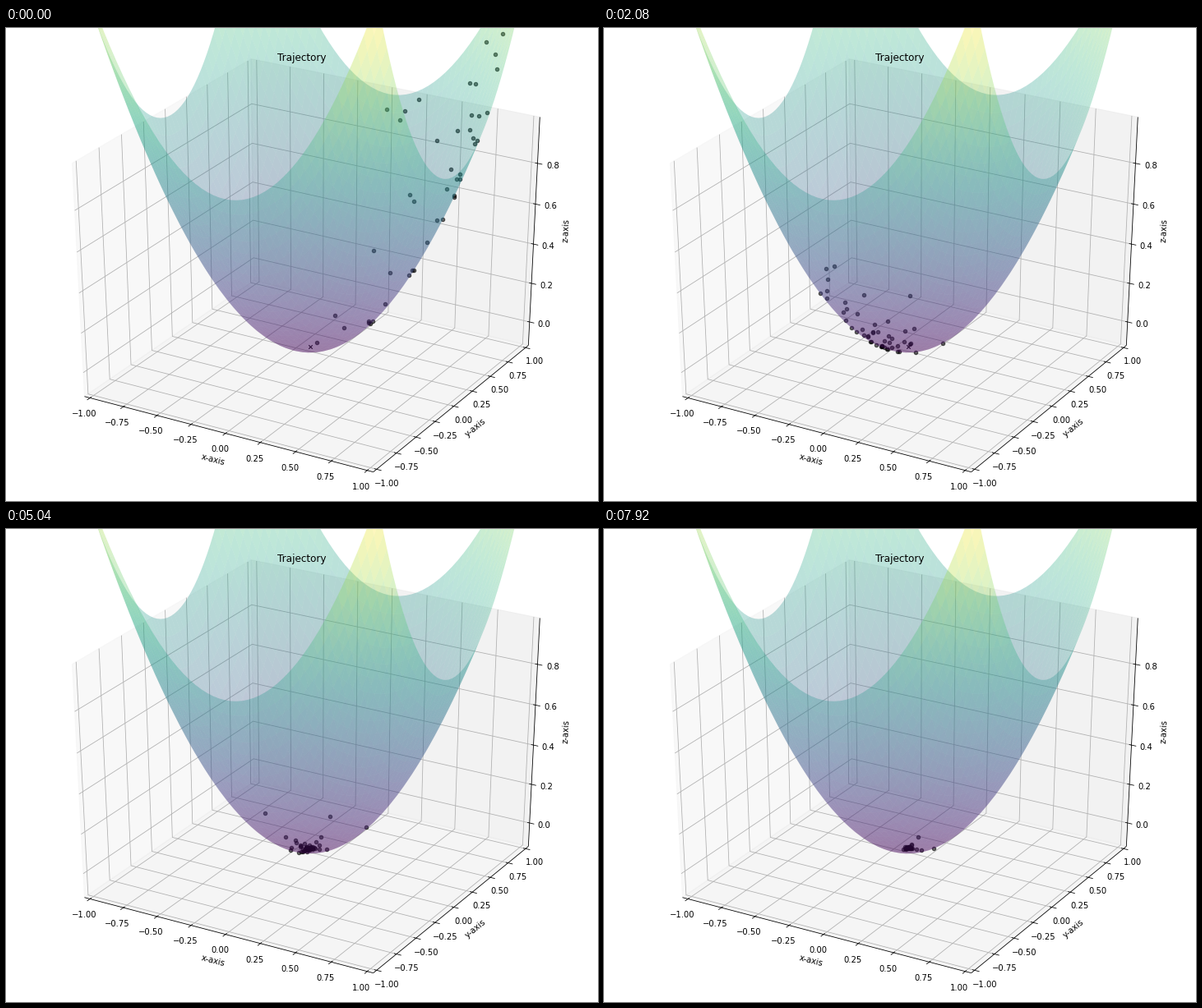
Recreate the animation shown at these times as a matplotlib script. Size 720 by 576 pixels, loop 8 s.

```python
import numpy as np
import matplotlib.pyplot as plt
from matplotlib.animation import FuncAnimation
from matplotlib.collections import LineCollection, PolyCollection

W, H = 720, 576
FRAMES, INTERVAL = 100, 80
Z_MIN, Z_MAX = -0.1, 1.0
DIST = 10
M = 0.5 + 1 / 48          # half size of the box, margin included
DELTA = 1 / 12            # unit for ticks and paddings
PER_POINT = 48 / (W + H) * DELTA

plt.rcParams["font.family"] = "DejaVu Sans"
plt.rcParams["font.size"] = 10

# Camera basis: elevation 30 degrees, azimuth -60 degrees
ELEV, AZIM = np.radians([30, -60])
TOWARD = np.array([np.cos(AZIM) * np.cos(ELEV),
                   np.sin(AZIM) * np.cos(ELEV), np.sin(ELEV)])
RIGHT = np.array([-np.sin(AZIM), np.cos(AZIM), 0])
UP = np.cross(TOWARD, RIGHT)


def project(p):
    """Box coordinates (centred, unit size) to stage pixels and depth."""
    p = np.asarray(p, float)
    depth = DIST - p @ TOWARD
    sx = (p @ RIGHT / depth + 0.095) / 0.185 * W
    sy = H - (p @ UP / depth + 0.095) / 0.185 * H
    return np.stack([sx, sy], axis=-1), depth


def box_z(z):
    return (z - Z_MIN) / (Z_MAX - Z_MIN) - 0.5


def lift(x, y):
    """Put points of the plane onto the bowl, in box coordinates."""
    return np.stack([x / 2, y / 2, box_z(x**2 + y**2)], axis=-1)


def at(base, i, t):
    p = np.array(base, float)
    p[i] = t
    return p


fig = plt.figure(figsize=(W / 72, H / 72), dpi=72, facecolor="white")
ax = fig.add_axes([0, 0, 1, 1])
ax.set_xlim(0, W)
ax.set_ylim(H, 0)
ax.axis("off")


def draw_pane(corners, shade):
    xy, _ = project(corners)
    ax.add_patch(plt.Polygon(xy, facecolor=str(shade), edgecolor=str(shade),
                             linewidth=1, alpha=0.5, zorder=0))


def draw_axis(i, name, ticks, fmt, base, tick_dir, outward, wall):
    """One box axis: grid, axis line, ticks, tick labels and name."""
    ends, _ = project([at(base, i, -M), at(base, i, M)])
    push = np.sign(base)
    grid, marks = [], []
    for value, t in ticks:
        grid.append(project([at(w, i, t) for w in wall])[0])
        edge = at(base, i, t)
        step = at(np.zeros(3), tick_dir, outward * DELTA)
        marks.append(project([edge - 0.1 * step, edge + 0.2 * step])[0])
        (lx, ly), _ = project(edge + push * 11.5 * PER_POINT)
        ax.text(lx, ly, fmt.format(value).replace("-", "\u2212"),
                ha="center", va="top")
    ax.add_collection(LineCollection(grid, colors="#b0b0b0",
                                     linewidths=0.8, zorder=1))
    ax.add_collection(LineCollection(marks + [ends], colors="black",
                                     linewidths=0.8, zorder=1.2))
    dx, dy = ends[1] - ends[0]
    (lx, ly), _ = project(at(base, i, 0) + push * 25 * PER_POINT)
    ax.text(lx, ly, name, ha="center", va="center",
            rotation=np.degrees(np.arctan2(-dy, dx)))


draw_pane([(-M, -M, -M), (-M, M, -M), (-M, M, M), (-M, -M, M)], 0.95)
draw_pane([(-M, M, -M), (M, M, -M), (M, M, M), (-M, M, M)], 0.9)
draw_pane([(-M, -M, -M), (M, -M, -M), (M, M, -M), (-M, M, -M)], 0.925)

flat = [(v, v / 2) for v in np.linspace(-1, 1, 9)]
tall = [(v, box_z(v)) for v in np.arange(5) * 0.2]
draw_axis(0, "x-axis", flat, "{:.2f}", (0, -M, -M), 1, -1,
          [(0, -M, -M), (0, M, -M), (0, M, M)])
draw_axis(1, "y-axis", flat, "{:.2f}", (M, 0, -M), 0, 1,
          [(M, 0, -M), (-M, 0, -M), (-M, 0, M)])
draw_axis(2, "z-axis", tall, "{:.1f}", (M, M, 0), 0, 1,
          [(-M, -M, 0), (-M, M, 0), (M, M, 0)])
ax.text(W / 2, H * 0.08 - 6, "Trajectory", fontsize=12, ha="center",
        va="baseline", zorder=5)


def draw_bowl(n=50):
    gx, gy = np.meshgrid(np.linspace(-1, 1, n + 1), np.linspace(-1, 1, n + 1))

    def quads(a):
        return np.stack([a[:-1, :-1], a[:-1, 1:], a[1:, 1:], a[1:, :-1]],
                        axis=2).reshape((n * n, 4) + a.shape[2:])

    xy, depth = project(lift(gx, gy))
    height = quads(gx**2 + gy**2).mean(axis=1)
    height = (height - height.min()) / np.ptp(height)
    order = np.argsort(-quads(depth).mean(axis=1))
    colors = plt.get_cmap("viridis")(height[order], alpha=0.3)
    ax.add_collection(PolyCollection(quads(xy)[order], facecolors=colors,
                                     edgecolors="none", zorder=3))


draw_bowl()

# Stage positions of the particles at the start
START = [
    (604, 7), (584, 17), (595, 32), (597, 50), (564, 67), (571, 68),
    (502, 87), (463, 99), (485, 101), (479, 112), (585, 103), (566, 106),
    (575, 107), (549, 125), (564, 124), (568, 134), (573, 137), (570, 141),
    (524, 137), (541, 172), (552, 178), (548, 184), (552, 184), (536, 196),
    (545, 204), (545, 206), (491, 203), (496, 211), (524, 234), (531, 233),
    (512, 261), (447, 271), (467, 298), (494, 295), (496, 295), (490, 301),
    (461, 336), (400, 350), (446, 357), (441, 357), (441, 359), (443, 360),
    (411, 365), (378, 383)]


def unproject(points):
    """Find the plane positions on the inner side of the bowl."""
    g = np.linspace(0, 1, 701)
    gx, gy = (a.ravel() for a in np.meshgrid(g, g))
    inner = gy > 0.577 * gx - 0.2
    gx, gy = gx[inner], gy[inner]
    xy, _ = project(lift(gx, gy))
    best = [np.argmin((xy[:, 0] - px)**2 + (xy[:, 1] - py)**2)
            for px, py in points]
    return np.column_stack([gx[best], gy[best]])


def swarm(w=0.9, c1=0.5, c2=0.3):
    """Particle swarm on the sphere function, one position set per frame."""
    rng = np.random.default_rng(4)
    pos = np.vstack([unproject(START), rng.uniform(0.89, 1, (6, 2))])
    vel = rng.uniform(0, 1, pos.shape)
    best, best_cost = pos.copy(), np.full(len(pos), np.inf)
    history = []
    for _ in range(FRAMES):
        cost = (pos**2).sum(axis=1)
        better = cost < best_cost
        best[better], best_cost[better] = pos[better], cost[better]
        leader = best[best_cost.argmin()]
        history.append(project(lift(pos[:, 0], pos[:, 1]))[0])
        r1, r2 = rng.uniform(0, 1, (2,) + pos.shape)
        vel = w * vel + c1 * r1 * (best - pos) + c2 * r2 * (leader - pos)
        pos = pos + vel
    return history


history = swarm()
goal, _ = project(lift(0.0, 0.0))
ax.scatter(*goal, s=20, marker="x", color="black", linewidths=1, zorder=2)
dots = ax.scatter(*history[0].T, s=20, color="black", alpha=0.6,
                  linewidths=1, zorder=2.2)
ax.set_xlim(0, W)
ax.set_ylim(H, 0)


def update(frame):
    dots.set_offsets(history[frame])
    return [dots]


anim = FuncAnimation(fig, update, frames=FRAMES, interval=INTERVAL,
                     repeat=True, repeat_delay=0, blit=False)
plt.show()
```
